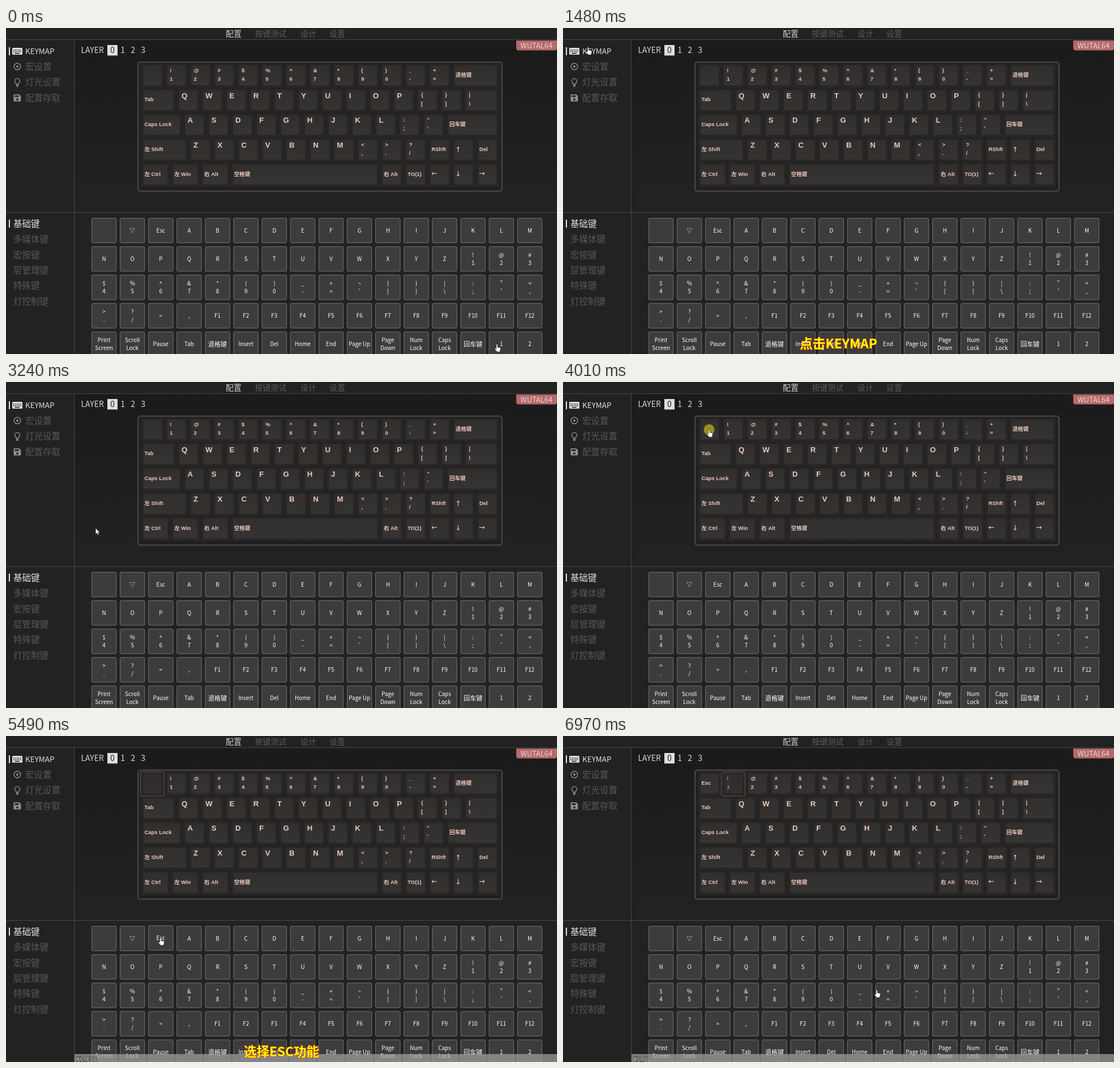
These frames come from a looping animation (973x575 px, 7050 ms). An HTML page:

```html
<!DOCTYPE html>
<html lang="zh">
<head>
<meta charset="utf-8">
<title>Keymap</title>
<style>
html, body { margin: 0; width: 100%; height: 100%; overflow: hidden; background: #222; }
svg { display: block; width: 973px; height: 575px; font-family: "Noto Sans CJK SC", "Noto Sans CJK", "Noto Sans", sans-serif; }
text { white-space: pre; }
.legend { font-family: "Liberation Sans", "Noto Sans CJK SC", "Noto Sans CJK", sans-serif; font-weight: 700; fill: #ecc9bc; }
.arrow { font-weight: 700; fill: #ecc9bc; }
.thin { font-weight: 300; }
.caption { font-weight: 700; fill: #ff0; stroke: #e02a10; stroke-width: 1.2px; paint-order: stroke; }
.code { stroke: #222; stroke-width: 1.6px; paint-order: stroke; }
</style>
</head>
<body>
<svg id="stage" viewBox="0 0 973 575">
  <defs>
    <linearGradient id="pane" x2="0" y2="1"><stop stop-color="#1c1b1b"/><stop offset="1" stop-color="#232222"/></linearGradient>
    <linearGradient id="cap" x2="0" y2="1"><stop stop-color="#312e2e"/><stop offset="1" stop-color="#363333"/></linearGradient>
  </defs>
</svg>
<script>
const LOOP = 7050;
const stage = document.getElementById('stage');

const esc = s => s.replace(/&/g, '&amp;').replace(/</g, '&lt;').replace(/>/g, '&gt;');
const rect = (x, y, w, h, fill, extra = '') =>
  `<rect x="${x}" y="${y}" width="${w}" height="${h}" fill="${fill}" ${extra}/>`;
// Text whose capitals are centred on cy
const label = (s, x, cy, size, fill, extra = '') =>
  `<text x="${x}" y="${cy + size * 0.37}" font-size="${size}" fill="${fill}" ${extra}>${esc(s)}</text>`;
const centred = 'text-anchor="middle"';
const linesOf = s => /^[^A-Z].$/.test(s) ? [...s] : s.replace(/·/g, ' ').split('¦');

function add(markup) {
  stage.insertAdjacentHTML('beforeend', markup);
  return stage.lastElementChild;
}

// Panels
add(`<g>${rect(0, 0, 973, 575, '#222')}${rect(121, 21, 852, 304, 'url(#pane)')}
  <path d="M0 20.5H973M0 325.5H973M120.5 21V575" stroke="#484848" fill="none"/></g>`);

// Top tabs
[['配置', 388], ['按键测试', 439.5], ['设计', 520], ['设置', 571]].forEach(([s, x], i) =>
  add(label(s, x, 9.5, 13.9, i ? '#5c5c5c' : '#d0d0d0', 'class="thin"')));

// Side menus
const menu = [];
function menuItem(name, x, cy, active, size = 15.5, icon = '') {
  const mark = active ? rect(5, cy - 7, 2, 14, '#e4e4e4') : '';
  const color = active ? '#e0e0e0' : '#585858';
  const el = add(`<g fill="${color}" color="${color}">${mark}${icon}${label(name, x, cy, size, 'currentColor', 'class="thin"')}</g>`);
  menu.push({ el, cy, active, color });
}
const keyHoles = [0, 1, 2, 3, 4].map(i => `M${13 + i * 3} 38h1.6v1.7h-1.6zM${13 + i * 3} 41h1.6v1.7h-1.6z`).join('');
const icons = [
  `<rect x="11" y="35" width="18" height="12" rx="1.5"/><path d="${keyHoles}M15.5 44h8.5v1.5h-8.5z" fill="#222"/>`,
  '<circle cx="20" cy="68" r="5.8" fill="none" stroke="#909090" stroke-width="1.4"/><circle cx="20" cy="68" r="1.9" fill="#909090"/>',
  '<path d="M18 99.5v-1.8a4.5 4.5 0 1 1 4 0v1.8zM18 101.5h4M18.5 103h3" fill="none" stroke="#909090" stroke-width="1.3"/>',
  '<path d="M13.5 118q0-1 1-1h8.8l3 3v8.5q0 1-1 1h-10.8q-1 0-1-1z" fill="#909090"/><path d="M15.5 118.7h7v3h-7z" fill="#222"/><circle cx="20" cy="126" r="1.9" fill="#222"/>'
];
menuItem('KEYMAP', 34, 41, true, 13.5, icons[0]);
['宏设置', '灯光设置', '配置存取'].forEach((s, i) => menuItem(s, 34, 68 + i * 27.5, false, 15.5, icons[i + 1]));
['基础键', '多媒体键', '宏按键', '层管理键', '特殊键', '灯控制键'].forEach((s, i) =>
  menuItem(s, 13, 345 + i * 27.4, !i));

// Layer switch and device badge
add(label('LAYER', 132.5, 39.2, 13.9, '#d8d8d8'));
add(rect(179, 30, 18, 18.5, '#dedede'));
[0, 1, 2, 3].forEach(n => add(label(String(n), 188 + n * 18.1, 39, 14.2, n ? '#d8d8d8' : '#222', centred)));
add('<path d="M901 22H973V35Q973 39.5 968.500 39.5H905.500Q901 39.5 901 35Z" fill="#b5696a"/>');
add(label('WUTAL64', 936.8, 30.8, 12.8, '#ead9d6', centred));

// Keyboard
const UNIT = 42.25;
const board = [
  '␣ !1 @2 #3 $4 %5 ^6 &7 *8 (9 )0 _- += 退格键×2',
  'Tab×1.5 Q W E R T Y U I O P {[ }] |\\×1.5',
  'Caps·Lock×1.75 A S D F G H J K L :; "\' 回车键×2.25',
  '左·Shift×2 Z X C V B N M <, >. ?/ RShft ↑ Del',
  '左·Ctrl×1.25 左·Win×1.25 右·Alt×1.25 空格键×6.25 右·Alt TO(1) ← ↓ →'
];
add(rect(233.3, 60.3, 642.4, 227.4, '#201e1e', 'stroke="#444343" stroke-width="2.6" rx="4"'));

function legend(name, x, y) {
  if (name === '␣') return '';
  const cls = 'class="legend"';
  if (/[←↑→↓]/.test(name)) return label(name, x + 6, y + 19.5, 10.5, '', 'class="arrow"');
  const lines = linesOf(name);
  if (lines.length === 2) return lines.map((s, i) => label(s, x + 9, y + 11.2 + i * 15.2, 9.5, '', cls)).join('');
  return /^[A-Z]$/.test(name)
    ? label(name, x + 8.6, y + 12, 13.2, '', cls)
    : label(lines[0], x + 6.4, y + 19, 9.5, '', cls);
}
const caps = [];
board.forEach((row, r) => {
  let x = 238;
  const y = 63 + r * 43.75;
  for (const token of row.split(' ')) {
    const [name, units = 1] = token.split('×');
    const w = units * UNIT;
    caps.push(add(`<g>${rect(x, y, w - 0.8, 43, '#272525', 'rx="3"')}
      ${rect(x + 4.8, y + 3, w - 10.3, 35, 'url(#cap)', 'rx="2.5"')}${legend(name, x, y)}
      ${rect(x - 0.5, y + 0.5, w - 0.5, 42.5, 'none', 'class="ring" rx="2" stroke="#a56767" visibility="hidden"')}</g>`));
    x += w;
  }
});
const escLegend = add(legend('Esc', 238, 63));

// Key picker
const PITCH = 50.12, KEY = 43.4;
const picker = [
  '␣ ▽ Esc A B C D E F G H I J K L M',
  'N O P Q R S T U V W X Y Z !1 @2 #3',
  '$4 %5 ^6 &7 *8 (9 )0 _- += ~` {[ }] |\\ :; "\' <,',
  '>. ?/ = , F1 F2 F3 F4 F5 F6 F7 F8 F9 F10 F11 F12',
  'Print¦Screen Scroll¦Lock Pause Tab 退格键 Insert Del Home End Page·Up Page¦Down Num¦Lock Caps¦Lock 回车键 1 2'
];
const pads = picker.flatMap((row, r) => row.split(' ').map((name, c) => {
  const x = 151.4 + c * PITCH, y = 335.5 + r * PITCH;
  const lines = name === '␣' ? [] : linesOf(name);
  const size = /[退回]/.test(name) ? 11 : 9.9;
  const text = lines.map((s, i) =>
    label(s, x + KEY / 2, y + KEY / 2 + (i - (lines.length - 1) / 2) * 14, size, '#fff', centred)).join('');
  const el = add(`<g>${rect(x, y, KEY, KEY, '#3c3c3c', 'stroke="#717171" rx="1.5"')}${text}</g>`);
  return { el, x, y };
}));

// Status strip, caption, pointer
const status = add(`<g>${rect(121, 561, 852, 14, '#a0a0a0', 'fill-opacity=".72"')}
  ${label('', 124.5, 570.3, 9.9, '#fff', 'class="code"')}</g>`);
const statusText = status.lastElementChild;
const caption = add(`<text class="caption" x="486.5" y="565" font-size="22.6" ${centred}></text>`);
const pointer = add(`<g><circle r="9.5" fill="#ff0" fill-opacity=".47"/>
  <path d="M0 0V11L2.5 8.7L4.2 12.5L6 11.7L4.3 8H7.7Z" fill="#fff" stroke="#111" stroke-width=".6"/>
  <path d="M-1.2 .9a1.2 1.2 0 0 1 2.4 0v4l4 .8q1.4 .3 1.2 1.8l-.7 4q-.2 1.7-1.7 1.7h-3q-1 0-1.6-.8l-3-4q-.6-1 .4-1.4q.8-.3 2 .9z" fill="#fff" stroke="#111" stroke-width=".6"/></g>`);
const [clickSpot, arrow, hand] = pointer.children;

// Time tables, in ms
const path = [
  [0, 867, 558], [70, 867, 558], [330, 560, 345], [610, 98, 86], [760, 62, 65], [840, 56, 58], [1070, 44.5, 34],
  [1700, 44.5, 34], [2080, 85, 292], [2390, 39.5, 346], [3090, 39.5, 346], [3240, 158, 258], [3710, 258, 84],
  [4410, 258, 84], [4710, 208, 265], [4960, 228, 340], [5190, 273, 356], [5650, 273, 356], [5890, 275, 355],
  [6680, 275, 355], [6820, 423, 402], [6900, 520, 412], [6970, 554, 448], [LOOP, 554, 448]
];
const captions = [[0, ''], [440, '点击KEYMAP'], [1500, ''], [1700, '点击基础键'], [3090, ''], [5000, '选择ESC功能'], [6120, '']];
const codes = [[0, ''], [70, 'KC_P1'], [330, ''], [4950, 'KC_TRNS'], [5080, 'KC_ESC'], [6760, 'KC_R'], [6820, 'KC_S'], [6880, 'KC_U']];
const clicks = [[1300, 1480], [2540, 2710], [4010, 4110], [5890, 5960]];

const current = (table, t) => table.findLast(row => row[0] <= t)[1];
const show = (el, on) => el.setAttribute('visibility', on ? 'visible' : 'hidden');
const setText = (el, s) => { if (el.textContent !== s) el.textContent = s; };

function pointerAt(t) {
  const i = path.findIndex(p => p[0] > t);
  const [t0, x0, y0] = path[i - 1], [t1, x1, y1] = path[i];
  const k = (t - t0) / (t1 - t0);
  return [x0 + (x1 - x0) * k, y0 + (y1 - y0) * k];
}

function draw(t) {
  const [x, y] = pointerAt(t);
  pointer.setAttribute('transform', `translate(${x} ${y})`);
  const overMenu = x < 97 && ((y > 28 && y < 136) || (y > 332 && y < 495));
  const overKeys = (x > 151 && y > 335) || (x > 238 && x < 872 && y > 63 && y < 283);
  show(hand, overMenu || overKeys);
  show(arrow, !overMenu && !overKeys);
  show(clickSpot, clicks.some(([a, b]) => t >= a && t < b));

  for (const m of menu) {
    const lit = overMenu && !m.active && Math.abs(y - m.cy) < 13;
    m.el.setAttribute('color', lit ? '#a8a8a8' : m.color);
  }
  for (const p of pads) {
    const over = x > p.x && x < p.x + KEY && y > p.y && y < p.y + KEY;
    p.el.setAttribute('transform', over && t >= 70 && t < 6950 ? 'translate(0 -1)' : '');
  }

  // The selected key is lightened and breathes
  const selected = t < 4060 ? -1 : t < 6120 ? 0 : 1;
  const glow = 0.75 + 0.25 * Math.cos((t - 4760) / 750 * Math.PI);
  caps.slice(0, 2).forEach((cap, i) => {
    const on = i === selected;
    cap.style.filter = on ? 'brightness(1.25)' : '';
    cap.style.opacity = on ? glow : 1;
    show(cap.querySelector('.ring'), on);
  });
  show(escLegend, t >= 5960);

  setText(caption, current(captions, t));
  const code = current(codes, t);
  show(status, code);
  setText(statusText, code);
}

const start = performance.now();
(function tick() {
  draw((performance.now() - start) % LOOP);
  requestAnimationFrame(tick);
})();
</script>
</body>
</html>
```
